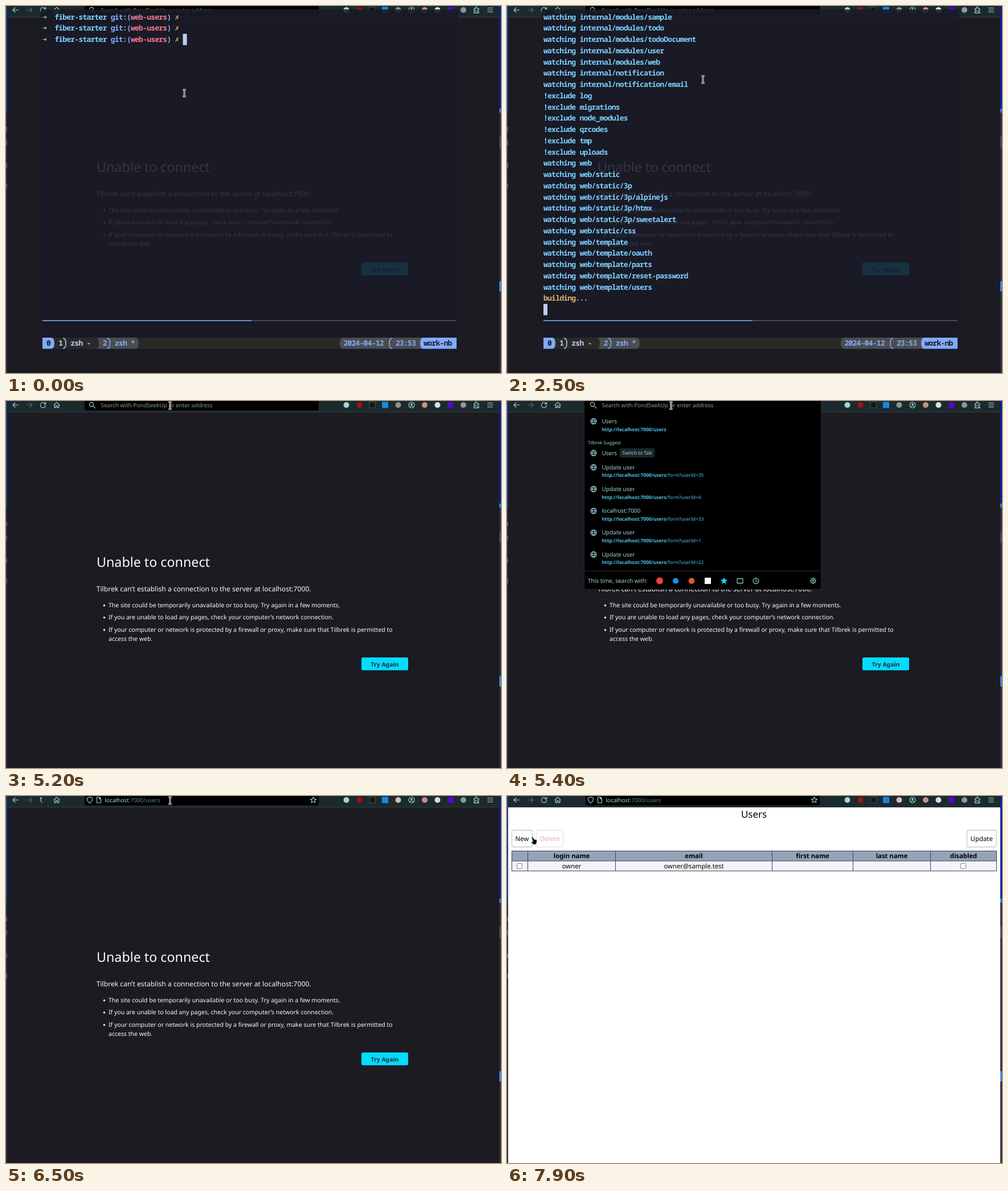
Recreate the animation shown at these times as an HTML page. Size 869 px wide and 644 px high, loop 8 s.

```html
<!DOCTYPE html>
<html lang="en">
<head>
<meta charset="utf-8">
<title>Terminal and browser</title>
<style>
html, body { margin: 0; width: 100%; height: 100%; overflow: hidden; background: #1c1b22; }
svg { display: block; width: 100%; height: 100%; }
text { white-space: pre; text-rendering: geometricPrecision; font-family: "Noto Sans", sans-serif; }
#term text, #probe {
  font: 700 13px "Noto Sans Mono", "DejaVu Sans Mono", monospace;
  font-stretch: semi-condensed;
}
.line { fill: none; stroke: #9adbd5; stroke-width: 1.1; stroke-linecap: round; stroke-linejoin: round; }
</style>
</head>
<body>
<svg id="stage" viewBox="0 0 869 644"></svg>
<script>
const LOOP = 8000, CELL = 7.045, ROW = 19.75, LEFT = 64, TOP = 9.3;
const INK = '#c0caf5', CYAN = '#7dcfff', BLUE = '#82aaff', GREEN = '#9ece6a',
      AMBER = '#e0af68', RED = '#f7768e', DIM = '#4b5479', TEAL = '#9adbd5';
const HOST = 'localhost:7000', USERS_URL = `http://${HOST}/users`;

const stage = document.getElementById('stage');
const $ = id => document.getElementById(id);
const rect = (x, y, w, h, fill, more = '') => `<rect x="${x}" y="${y}" width="${w}" height="${h}" fill="${fill}" ${more}/>`;
const dot = (x, y, r, fill, more = '') => `<circle cx="${x}" cy="${y}" r="${r}" fill="${fill}" ${more}/>`;
const line = (d, more = '') => `<path class="line" d="${d}" ${more}/>`;
const at = (x, y, body) => `<g transform="translate(${x} ${y})">${body}</g>`;
const label = (x, y, size, fill, s, more = '') => `<text x="${x}" y="${y}" font-size="${size}" fill="${fill}" ${more}>${s}</text>`;
const group = (id, body) => `<g id="${id}">${body}</g>`;
const MID = 'text-anchor="middle"', BOLD = 'font-weight="700"';

/* Browser */
const globe = y => at(152, y, line('M-5 0a5 5 0 1 0 10 0a5 5 0 1 0-10 0zM-5 0h10M0-5q-5 5 0 10q5-5 0-10'));
const STAR = 'M0-5.2 1.5-1.8 5.2-1.5 2.4.9 3.3 4.6 0 2.6-3.3 4.6-2.4.9-5.2-1.5-1.5-1.8z';
const GLASS = line('M-5-1a3.6 3.6 0 1 0 7.2 0a3.6 3.6 0 1 0-7.2 0M1.3 1.6l4 4');
const ARROW = 'M-5 0h10M1-4l4 4-4 4';

function desktopEdges() {
  return rect(0, 0, 2, 644, '#2b3040') + rect(0, 0, 1.5, 186, '#0b4fae') +
    [212, 236, 276, 312].map(y => rect(0, y, 1.5, 8, '#6b7488')).join('') +
    rect(866, 0, 3, 644, '#2c3040') + rect(866, 0, 3, 180, '#0a2390') + rect(866, 180, 3, 7, '#1c86d8') +
    rect(866, 229, 3, 20, '#464b58') + rect(866, 483, 3, 18, '#3f8ae8');
}

function toolbar() {
  return rect(2, 0, 864, 19, '#1c292d') + rect(2, 19, 864, 1, '#333c42') +
    rect(138, -8, 411, 24.5, '#000', 'rx="4"') +
    at(17, 7, line('M5 0h-10M-1-4l-4 4 4 4')) +
    at(41, 7, line(ARROW, 'opacity=".4"')) +
    group('reload', at(65, 7, line('M3.6-2.7a4.6 4.6 0 1 0 1 3M4.7-5v3.3h-3.3'))) +
    group('loading', at(62, 7, line('M-1-4q-1 5 2 8M-1.5-1.5l.4-3 2.6 1.5'))) +
    at(89, 7, line('M-5 0 0-4.8 5 0M-3.8-1v5.6h2.6v-3.2h2.4v3.2h2.6v-5.6')) +
    dot(597.5, 7, 5, TEAL) + dot(620.5, 7, 5, '#a30f16') +
    rect(638, 2, 10.5, 10, '#10171b', 'stroke="#46535a"') + rect(660, 1.5, 11, 11, '#1687e0', 'rx="1"') +
    dot(688.5, 7, 5, '#8c9295', 'id="addon"') +
    at(712, 7, line('M-5 0a5 5 0 1 0 10 0a5 5 0 1 0-10 0') + dot(0, -1.3, 1.8, TEAL) + line('M-2.8 3q2.8-3 5.6 0')) +
    dot(735, 7, 5, '#c98f86') + dot(757.5, 7, 5, '#d5dfe2') + rect(775.5, 2, 9.5, 10, '#5207d6') +
    dot(803, 7, 5, '#90969b') +
    at(826, 7, line('M-4.5-2.5h2.7q-.8-3 1.3-3t1.3 3h3.2v3q-3-.7-3 1.3t3 1.3v2h-8.5v-2.6q2.6 0 2.6-1.3t-2.6-1.3z')) +
    at(850, 7, line('M-4.5-3.5h9M-4.5 0h9M-4.5 3.5h9')) +
    group('searchBar', at(151.5, 7, GLASS) + label(166.5, 11, 9.95, '#82999d', 'Search with PondSeekUp or enter address')) +
    group('addressBar',
      at(147, 7, line('M0-5.3 4.7-3.6q0 6.5-4.7 9q-4.7-2.5-4.7-9z')) +
      at(163, 7, line('M-3.5-5h4.3l2.7 2.7v7.3h-7zM.6-5v2.9h2.9')) +
      label(173.5, 11, 10, '#a9dcd8', 'localhost<tspan fill="#627f82">:7000/users</tspan>') +
      at(539.5, 7, line(STAR)));
}

function errorPage() {
  const items = [
    [362, 'The site could be temporarily unavailable or too busy. Try again in a few moments.'],
    [383.3, 'If you are unable to load any pages, check your computer’s network connection.'],
    [405, 'If your computer or network is protected by a firewall or proxy, make sure that Tilbrek is permitted to']
  ];
  return label(159, 291, 23.25, '#fbfbfe', 'Unable to connect') +
    label(158.7, 334, 12.13, '#fbfbfe', `Tilbrek can’t establish a connection to the server at ${HOST}.`) +
    items.map(([y, s]) => dot(172.5, y - 3.3, 1.7, '#fbfbfe') + label(180, y, 10.54, '#fbfbfe', s)).join('') +
    label(180, 421, 10.54, '#fbfbfe', 'access the web.') +
    rect(624, 450, 82, 22.5, '#00ddff', 'rx="2.8"') +
    label(665, 465.6, 10.4, '#2b2a33', 'Try Again', MID + ' font-weight="600"');
}

function usersPage() {
  const edges = [8.5, 36.5, 190.5, 465.5, 607.5, 743.5, 859.5];
  const heads = ['', 'login name', 'email', 'first name', 'last name', 'disabled'];
  const cells = ['', 'owner', 'owner@sample.test', '', '', ''];
  const button = (x, w, s, ink, border) =>
    rect(x, 60, w, 29.5, '#fff', `rx="3" stroke="${border}" stroke-width="1.3"`) + label(x + w / 2, 79, 11.4, ink, s, MID);
  const check = x => rect(x - 4.5, 118.5, 9, 9, '#fff', 'rx="1.5" stroke="#85858f"');
  const centred = (list, y, more) => list.map((s, i) =>
    label((edges[i] + edges[i + 1]) / 2, y, 11.3, '#000', s, MID + ' ' + more)).join('');
  return rect(2, 20, 864, 624, '#fff') + label(433.5, 38, 16.9, '#000', 'Users', MID) +
    button(8.5, 36, 'New', '#000', '#c2cad6') + button(51.5, 47, 'Delete', '#f3a6a6', '#e2e6ed') +
    button(807.5, 51.5, 'Update', '#000', '#c2cad6') +
    rect(8, 96, 852, 18, '#94a3b8') + rect(8, 114, 852, 17.5, '#f1f5f9') +
    `<path d="M8 96.5h852M8 114h852M8 131.5h852${edges.map(x => `M${x} 96v36`).join('')}" stroke="#3b4557" fill="none"/>` +
    centred(heads, 109.2, BOLD) + centred(cells, 127, '') + check(22) + check(801);
}

function suggestions({ rows, extra, active }) {
  const ids = [35, 4, 33, 1, 22, 43, 42];
  const bottom = 407 - 38.2 * (7 - rows) + (extra ? 21 : 0), foot = bottom - 15;
  const link = '#4fc6ea', first = active ? '#fff' : TEAL;
  const row = (id, i) => {
    const y = 116 + 38.23 * i;
    return globe(y + .3) + label(166.5, y + 3.7, 10, TEAL, i === 2 ? HOST : 'Update user') +
      label(166.5, y + 17.3, 8.4, link, `<tspan ${BOLD}>${USERS_URL}</tspan>/form?userId=${id}`);
  };
  return rect(135.5, -6, 416, bottom + 6, '#000', 'rx="4" stroke="#23272c"') +
    (active ? rect(139.5, 24, 408, 35, '#0061e0', 'rx="3"') + dot(536, 42, 8.5, '#0b2c66') +
      [-4, 0, 4].map(d => dot(536 + d, 42, 1.1, '#fff')).join('') : '') +
    at(151.5, 7, GLASS) +
    (active ? label(166.5, 11, 10, '#a9dcd8', USERS_URL) + at(539.5, 7, line(ARROW))
            : label(166.5, 11, 9.95, '#82999d', 'Search with PondSeekUp or enter address')) +
    globe(35.5) + label(166.5, 38.7, 10, first, 'Users') +
    label(166.5, 52.6, 8.4, active ? '#fff' : link, USERS_URL, BOLD) +
    label(142, 76, 8, TEAL, 'Tilbrek Suggest') +
    globe(91.3) + label(166.5, 94.7, 10, TEAL, 'Users') +
    rect(198, 83, 61, 16, '#1d272a', 'rx="2"') + label(228.5, 94.3, 8.4, TEAL, 'Switch to Tab', MID) +
    ids.slice(0, rows).map(row).join('') +
    (extra ? globe(308) + label(166.5, 311.5, 10, TEAL, HOST) : '') +
    rect(136, bottom - 33, 415, 1, '#2b2f35') +
    label(142, foot + 3.6, 10, TEAL, 'This time, search with:') +
    dot(268, foot, 6, '#ea4335') + dot(296, foot, 5, '#1593df') + dot(324, foot, 5.3, '#de5833') +
    rect(347, foot - 5.5, 11, 11, '#fff') +
    at(381, foot, `<path d="${STAR}" fill="#00ddff" stroke="#00ddff"/>`) +
    at(409, foot, line('M-5-4h10v8h-10z')) +
    at(437, foot, line('M-5 0a5 5 0 1 0 10 0a5 5 0 1 0-10 0M0-3v3.3l2.3 1.2')) +
    at(537.5, foot, line('M-4 0a4 4 0 1 0 8 0a4 4 0 1 0-8 0M-1.5 0a1.5 1.5 0 1 0 3 0a1.5 1.5 0 1 0-3 0') +
      line('M0-4v-1M0 4v1M-4 0h-1M4 0h1M-3-3l-.6-.6M3 3l.6.6M-3 3l-.6.6M3-3l.6-.6', 'stroke-width="1.8"'));
}

/* Terminal: a line is a list of [column, text, colour] */
const PROMPT = [[0, '➜', GREEN], [3, 'fiber-starter', CYAN], [17, 'git:(', BLUE], [22, 'web-users', RED], [31, ')', BLUE], [33, '✗', AMBER]];
const modules = ['sample', 'todo', 'todoDocument', 'user', 'web'].map(s => 'internal/modules/' + s);
const assets = ['', '/static', '/static/3p', '/static/3p/alpinejs', '/static/3p/htmx', '/static/3p/sweetalert',
  '/static/css', '/template', '/template/oauth', '/template/parts', '/template/reset-password', '/template/users'];
const plain = (s, ink = INK) => [[0, s, ink]];
const stars = plain('*'.repeat(50));
const LOG = [
  ...[...modules, 'internal/notification', 'internal/notification/email'].map(s => plain('watching ' + s, CYAN)),
  ...['log', 'migrations', 'node_modules', 'qrcodes', 'tmp', 'uploads'].map(s => plain('!exclude ' + s, CYAN)),
  ...assets.map(s => plain('watching web' + s, CYAN)),
  plain('building...', AMBER), plain('running...', GREEN),
  plain('2024/04/12 23:53:51 loaded config.yaml successfully'),
  stars, plain('server env: local'), plain('using DB: postgres'), stars, [], [],
  [[21, 'Fiber v2.52.0', CYAN]],
  [[17, 'http://127.0.0.1:7000', DIM]],
  [[9, '(bound on host 0.0.0.0 and port 7000)', DIM]], [],
  [[3, 'Handlers ' + '.'.repeat(12), DIM], [25, '95', CYAN], [29, 'Processes ' + '.'.repeat(11), DIM], [51, '1', CYAN]],
  [[3, 'Prefork ' + '.'.repeat(7) + ' Disabled', DIM], [29, 'PID ' + '.'.repeat(13), DIM], [47, '23445', CYAN]],
  [], []
];
const VISIBLE = 26;

const cells = (row, col, s, ink) =>
  `<text x="${LEFT + col * CELL}" y="${TOP + row * ROW + (s[0] === '*' ? 17 : 14.2)}" fill="${ink}">${s}</text>`;
const printed = (lines, from = 0) => lines.slice(from)
  .map((segments, row) => segments.map(([col, s, ink]) => cells(row, col, s, ink)).join('')).join('');

function statusBar() {
  const bar = (x, w, fill, l, r) => // l and r: corner radii of the left and right ends
    `<path fill="${fill}" d="M${x + l} 582h${w - l - r}q${r} 0 ${r} ${r ? 9.7 : 0}${r ? `t${-r} 9.8` : 'v19.5'}h${l + r - w}` +
    `q${-l} 0 ${-l} ${l ? -9.8 : 0}${l ? `t${l} -9.7` : 'v-19.5'}z"/>`;
  const curve = (x, bend, ink) => `<path d="M${x} 583q${bend} 0 ${bend} 9t${-bend} 9" fill="none" stroke="${ink}" stroke-width="1.6"/>`;
  return rect(LEFT, 551.3, 367, 1.6, BLUE) + rect(431, 551.3, 360, 1.6, '#55565c') +
    rect(LEFT, 582, 727, 19.5, '#292a28') + bar(150, 83, '#4c4d4f', 0, 6) + bar(85, 78, '#292a28', 0, 6) +
    bar(LEFT, 21, BLUE, 0, 6) + bar(586, 150, '#4c4d4f', 6, 0) + bar(727, 64, BLUE, 6, 0) +
    curve(100, 5, INK) + curve(177.5, 5, BLUE) + curve(678, -5, BLUE) +
    cells(29, 1, '0', '#1a1b26') + cells(29, 4, '1', INK) + cells(29, 7, 'zsh -', INK) +
    cells(29, 15, '2', BLUE) + group('job', '') +
    cells(29, 75, '2024-04-12', BLUE) + cells(29, 88, '23:53', BLUE) + cells(29, 95, 'work-nb', '#1a1b26');
}

function terminalText(typed, count) {
  if (!count) return printed([PROMPT, PROMPT, [...PROMPT, [35, typed, INK]]]);
  const frame = count === LOG.length ? rect(74.5, 354.5, 367, 138, 'none', 'stroke="#4f5f88" stroke-width="1.3"') : '';
  return printed(LOG.slice(0, count), count - VISIBLE) + frame;
}

/* Pointer */
const beam = 'M-2.6-6q2.6 0 2.6 1q0-1 2.6-1M0-5v10M-2.6 6q2.6 0 2.6-1q0 1 2.6 1';
const POINTERS =
  group('beam', `<path d="${beam}" fill="none" stroke="#fff" stroke-width="2.8"/><path d="${beam}" fill="none" stroke="#111" stroke-width=".9"/>`) +
  group('arrow', '<path d="M0 0v12.5l3-2.8 2 4.3 2-1-2-4.2h4z" stroke="#fff" stroke-width=".9"/>') +
  group('hand', '<path d="M.2.3q1.5-1.2 2.6.6l2 3.2 3.4.3q1.6 1 1.3 4l-1.8 4.6h-4.4l-3.6-3.6q-.3-1.6 1.6-1.2l1.2.5z" stroke="#fff" stroke-width=".7"/>');
const PATH = [[0, 313, 153], [100, 276, 164], [200, 312, 146], [300, 344, 129], [2500, 344, 129], [3300, 80, 109],
  [3900, 82, 111], [4000, 82, 111], [4300, 28, 111], [4700, 28, 111], [5200, 288, 8], [7300, 288, 8], [7900, 43, 72], [LOOP, 43, 72]];

function pointerAt(t) {
  const i = PATH.findIndex(p => p[0] > t);
  const [t0, x0, y0] = PATH[i - 1], [t1, x1, y1] = PATH[i];
  const u = (t - t0) / (t1 - t0), e = u * u * (3 - 2 * u);
  return [x0 + (x1 - x0) * e, y0 + (y1 - y0) * e];
}

stage.innerHTML = rect(0, 0, 869, 644, '#1c1b22') + toolbar() + group('error', errorPage()) + group('users', usersPage()) +
  group('suggest', '') + desktopEdges() +
  group('term', rect(61, 6, 733, 600, '#1a1b26', 'opacity=".88"') + statusBar() + group('screen', '') +
    `<rect id="caret" width="7" height="19.75" fill="${INK}"/>`) +
  group('pointer', POINTERS) + '<text id="probe" visibility="hidden">0000000000</text>';
// Fit the font's own advance to the terminal grid.
$('term').style.letterSpacing = CELL - $('probe').getComputedTextLength() / 10 + 'px';

const show = (id, on) => { $(id).style.display = on ? '' : 'none'; };
const step = (t, steps) => steps.filter(([start]) => t >= start).pop()[1];
const within = (t, a, b) => t >= a && t < b;
const shown = {};
function fill(id, key, build) {
  if (shown[id] === key) return;
  shown[id] = key;
  $(id).innerHTML = build();
}

const TYPED = [[0, ''], [1100, 'a'], [1300, 'ai'], [1400, 'air']];
const PRINTED = [[0, 0], [1500, VISIBLE], [3400, 27], [3600, 32], [3700, LOG.length]];
const LISTS = [[0, { rows: 5 }], [5600, { rows: 5, extra: true }], [5800, { rows: 7, active: true }]];

function render(t) {
  const typed = step(t, TYPED), count = step(t, PRINTED), list = step(t, LISTS), job = t < 3800 ? 'zsh *' : 'air *';
  fill('screen', typed + count, () => terminalText(typed, count));
  fill('job', job, () => cells(29, 18, job, BLUE));
  fill('suggest', JSON.stringify(list), () => suggestions(list));

  show('term', t < 4600);
  $('term').setAttribute('opacity', t < 4500 ? 1 : .5);
  $('caret').setAttribute('x', LEFT + (count ? 0 : 35 + typed.length) * CELL);
  $('caret').setAttribute('y', TOP + (count ? VISIBLE : 2) * ROW);
  show('caret', !within(t, 800, 1100) && !within(t, 2100, 2500) && !within(t, 3100, 3400));

  show('suggest', within(t, 5300, 6400));
  show('searchBar', t < 6400);
  show('addressBar', t >= 6400);
  show('loading', within(t, 6400, 6600));
  show('reload', !within(t, 6400, 6600));
  show('error', t < 6600);
  show('users', t >= 6600);
  $('addon').setAttribute('fill', t < 6400 ? '#8c9295' : '#d3bfae');

  const [x, y] = pointerAt(t);
  const kind = t >= 7800 ? 'hand' : t < 4300 || (y < 17 && x > 138) ? 'beam' : 'arrow';
  $('pointer').setAttribute('transform', `translate(${x} ${y})`);
  for (const id of ['beam', 'arrow', 'hand']) show(id, id === kind);
}

const begin = performance.now();
function tick() {
  const t = (performance.now() - begin) % LOOP;
  render(Math.floor(t / 100) * 100);
  requestAnimationFrame(tick);
}
tick();
</script>
</body>
</html>
```
